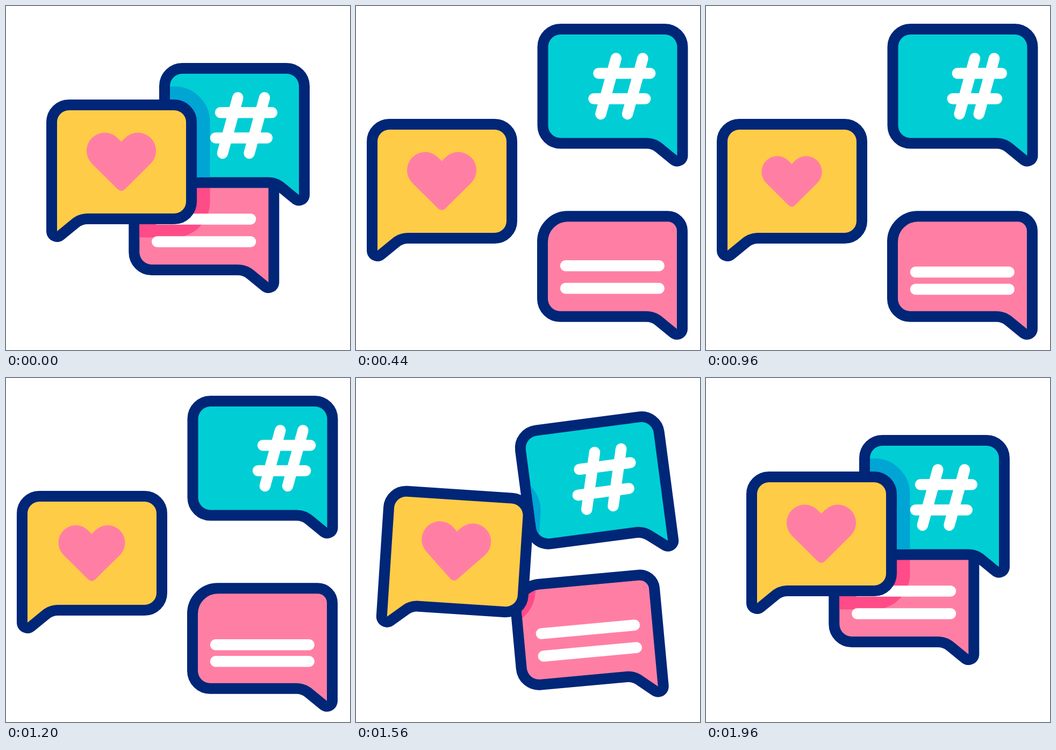
Animation of 640 by 640 pixels, one loop 2 s. Source, as an HTML page with a canvas:

```html
<!DOCTYPE html>
<html>
<head>
<meta charset="utf-8">
<style>
html, body { margin: 0; width: 100%; height: 100%; overflow: hidden; background: #fff; }
canvas { display: block; width: 640px; height: 640px; }
</style>
</head>
<body>
<canvas id="stage" width="640" height="640"></canvas>
<script>
const ctx = document.getElementById('stage').getContext('2d');
const LOOP = 2000, STEP = 40;
const NAVY = '#002678';

// Inner outline of a bubble with its tail at the lower left, or mirrored about x = flip / 2
function outline(top, bottom, tailR, farR, lowR, flip) {
  const path = new Path2D(`M95 ${bottom + 33}V${top + tailR}a${tailR} ${tailR} 0 0 1 ${tailR} ${-tailR}
    H${335 - farR}a${farR} ${farR} 0 0 1 ${farR} ${farR}
    V${bottom - lowR}a${lowR} ${lowR} 0 0 1 ${-lowR} ${lowR}
    H152C141 ${bottom} 131 ${bottom + 3.5} 122.5 ${bottom + 10.5}Z`);
  if (!flip) return path;
  const mirrored = new Path2D();
  mirrored.addPath(path, new DOMMatrix([-1, 0, 0, 1, flip, 0]));
  return mirrored;
}

// "mid" is the tilted pose on the way, "far" the spread pose
const love = { path: outline(194, 386, 22, 22, 22), fill: '#ffcc47',
  center: [215, 290], mid: [-20.5, 32], far: [-55, 36], tilt: 5 };
const tag = { path: outline(126, 318.5, 23, 23, 23, 640), fill: '#00ced4', shade: '#00a5d4',
  center: [425, 222], mid: [8.4, -18.2], far: [52.5, -73], tilt: -10 };
const note = { path: outline(314.5, 481, 17, 37, 23, 583.3), fill: '#ff7fa4', shade: '#ff4b88',
  center: [368, 397], mid: [48.2, 66], far: [108.7, 86.8], tilt: -7 };

const heart = new Path2D(`M214.5 252.5L207.5 245.5A33.7 33.7 0 0 0 159.8 293.2L208 341
  Q214.5 347 221 341L269.2 293.2A33.7 33.7 0 0 0 221.5 245.5Z`);

// Piecewise linear track of [time, value] keys
function track(keys, t) {
  if (t <= keys[0][0]) return keys[0][1];
  for (let i = 1; i < keys.length; i++) {
    const [t0, a] = keys[i - 1], [t1, b] = keys[i];
    if (t <= t1) return a + (b - a) * (t - t0) / (t1 - t0);
  }
  return keys[keys.length - 1][1];
}

const swing = (a, b, c) => [[480, 0], [760, a], [1040, b], [1200, c], [1400, 0]];
const barLeft = swing(-63, 48, 26.5), barRight = swing(-78, 35, 19);
const lineTop = swing(-49, 36, 13), lineLow = swing(-59, 26, 2);
const beat = [[480, 1], [640, .85], [800, 1.03], [960, .87], [1120, 1.03], [1280, .89], [1400, 1]];

// 0 = together, 1 = tilted, 2 = spread
function spread(t) {
  if (t < 280) return (t / 280) ** 2;
  if (t < 440) return 1 + (t - 280) / 160;
  if (t < 1440) return 2;
  if (t < 1600) return 2 - (t - 1440) / 160;
  return Math.max(0, 1 - (t - 1600) / 360) ** 2.35;
}

function place(b, p) {
  const k = Math.min(p, 1), m = Math.max(p - 1, 0);
  const [x, y] = [0, 1].map(i => b.center[i] + b.mid[i] * k + (b.far[i] - b.mid[i]) * m);
  ctx.setTransform(1, 0, 0, 1, x, y);
  ctx.rotate(b.tilt * (k - m) * Math.PI / 180);
  ctx.translate(-b.center[0], -b.center[1]);
}

function drawBubble(b, p, drawContent) {
  ctx.save();
  place(b, p);
  ctx.lineJoin = 'round';
  ctx.lineWidth = 40;
  ctx.strokeStyle = NAVY;
  ctx.stroke(b.path);
  ctx.fillStyle = b.fill;
  ctx.fill(b.path);
  if (b.shade) {
    ctx.save();
    ctx.clip(b.path);
    place(love, p);
    const k = Math.min(p, 1);
    ctx.translate(-12 * k, -7.5 * k);
    ctx.fillStyle = ctx.strokeStyle = b.shade;
    ctx.lineWidth = 89;
    ctx.stroke(love.path);
    ctx.fill(love.path);
    ctx.restore();
  }
  drawContent();
  ctx.restore();
}

function whiteLine(x0, y0, x1, y1) {
  ctx.strokeStyle = '#fff';
  ctx.lineWidth = 20.5;
  ctx.lineCap = 'round';
  ctx.beginPath();
  ctx.moveTo(x0, y0);
  ctx.lineTo(x1, y1);
  ctx.stroke();
}

function draw(t) {
  const p = spread(t);
  ctx.setTransform(1, 0, 0, 1, 0, 0);
  ctx.fillStyle = '#fff';
  ctx.fillRect(0, 0, 640, 640);

  drawBubble(note, p, () => {
    const a = 396.5 + track(lineTop, t), b = 438.5 + track(lineLow, t);
    whiteLine(281.3, a, 455, a);
    whiteLine(281.3, b, 455, b);
  });

  drawBubble(tag, p, () => {
    const l = track(barLeft, t), r = track(barRight, t);
    whiteLine(431.3 + l, 170.5, 402.8 + l, 274);
    whiteLine(481 + r, 170.5, 452.5 + r, 274);
    whiteLine(399 + l, 198.3, 494.7 + r, 198.3);
    whiteLine(390 + l, 245.5, 485.7 + r, 245.5);
  });

  drawBubble(love, p, () => {
    const s = track(beat, t);
    ctx.translate(214.5, 294);
    ctx.scale(s, s);
    ctx.translate(-214.5, -294);
    ctx.fillStyle = '#ff7fa4';
    ctx.fill(heart);
  });
}

const start = performance.now();
function tick() {
  const t = (performance.now() - start) % LOOP;
  draw(Math.floor(t / STEP) * STEP);
  requestAnimationFrame(tick);
}
tick();
</script>
</body>
</html>
```
